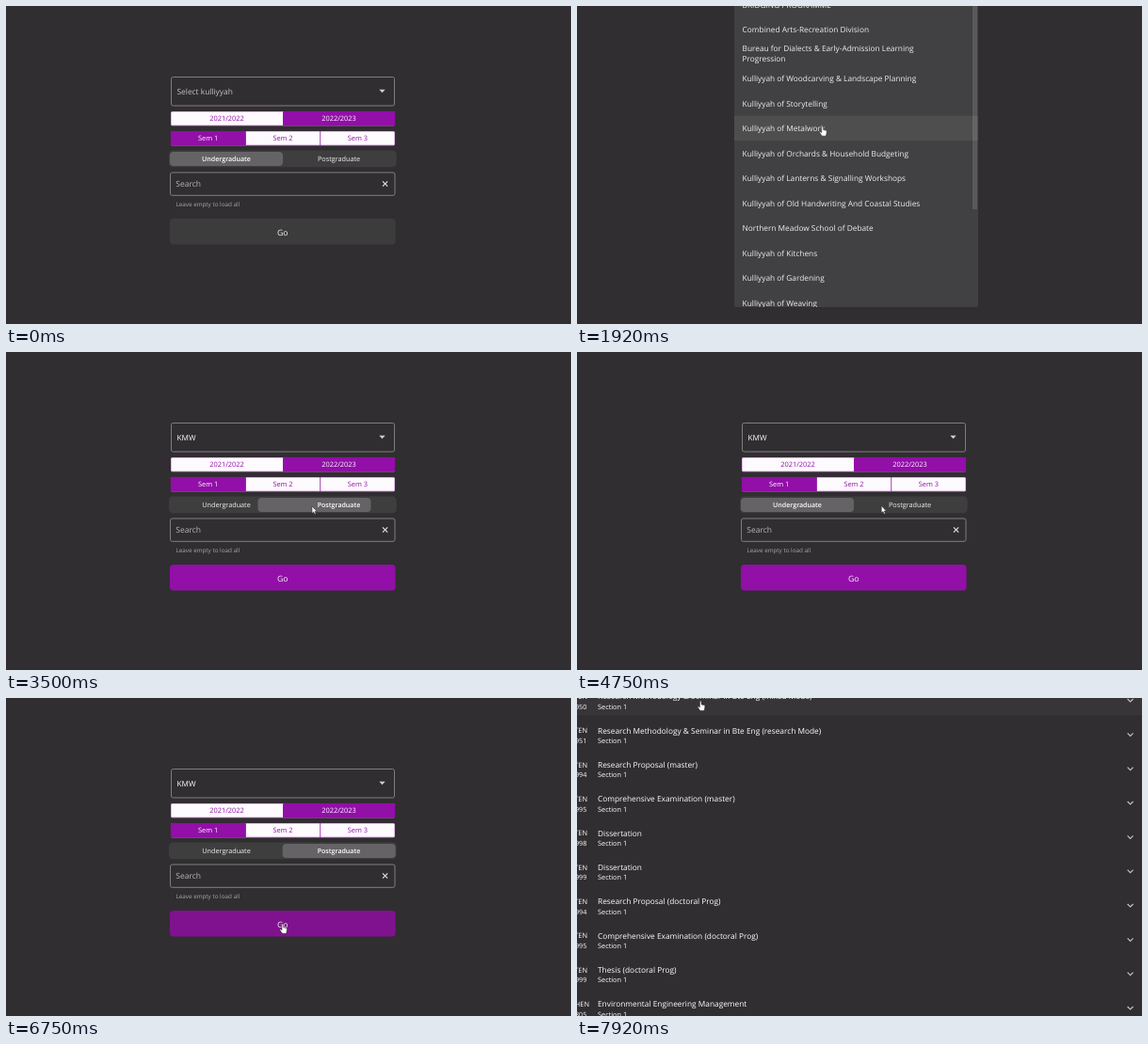
Recreate the animation shown at these times as an HTML page. Size 600 px wide and 338 px high, loop 8000 ms.

```html
<!DOCTYPE html>
<html lang="en">
<head>
<meta charset="utf-8">
<title>Course finder</title>
<style>
  html, body { margin: 0; width: 100%; height: 100%; overflow: hidden; background: #302e30; }
  svg { display: block; width: 600px; height: 338px; }
  text { font-family: "Open Sans", "Noto Sans", sans-serif; text-rendering: geometricPrecision; white-space: pre; }
</style>
</head>
<body>
<script>
const LOOP = 8000;
const BG = '#302e30', PURPLE = '#920fa8', WHITE = '#fdfbfd', LINE = '#807f80', BLUE = '#3f9fcb';
const WIN_LEFT = -15, WIN_WIDTH = 617;

// ---------- drawing helpers ----------
function el(parent, tag, attrs = {}) {
  const node = document.createElementNS('http://www.w3.org/2000/svg', tag);
  set(node, attrs);
  parent.appendChild(node);
  return node;
}
function set(node, attrs) {
  for (const key in attrs) node.setAttribute(key, attrs[key]);
}
const group = (parent, attrs) => el(parent, 'g', attrs);
const rect = (parent, x, y, width, height, fill, more) =>
  el(parent, 'rect', { x, y, width, height, fill, ...more });
const path = (parent, d, more) => el(parent, 'path', { d, fill: 'none', ...more });
function label(parent, str, x, y, size, fill = WHITE, anchor = 'start', more) {
  const node = el(parent, 'text', { x, y, 'font-size': size, fill, 'text-anchor': anchor, ...more });
  node.textContent = str;
  return node;
}
const show = (node, on) => set(node, { visibility: on ? 'visible' : 'hidden' });

// ---------- timing helpers ----------
const clamp = v => Math.min(1, Math.max(0, v));
const span = (t, a, b) => clamp((t - a) / (b - a));
const smooth = u => u * u * (3 - 2 * u);
const easeOut = u => 1 - Math.pow(1 - u, 3);

function track(keys, t) {
  if (t <= keys[0][0]) return keys[0].slice(1);
  for (let i = 1; i < keys.length; i++) {
    const a = keys[i - 1], b = keys[i];
    if (t <= b[0]) {
      const u = smooth(span(t, a[0], b[0]));
      return a.slice(1).map((v, k) => v + (b[k + 1] - v) * u);
    }
  }
  return keys[keys.length - 1].slice(1);
}

function bezier(x1, y1, x2, y2) {
  const f = (s, a, b) => 3 * (1 - s) * (1 - s) * s * a + 3 * (1 - s) * s * s * b + s * s * s;
  return x => {
    let lo = 0, hi = 1;
    for (let i = 0; i < 24; i++) {
      const mid = (lo + hi) / 2;
      if (f(mid, x1, x2) < x) lo = mid; else hi = mid;
    }
    return f(lo, y1, y2);
  };
}
const pageEase = bezier(.35, .91, .33, .97);

// ---------- scene ----------
const svg = el(document.body, 'svg', { viewBox: '0 0 600 338', width: 600, height: 338 });
const defs = el(svg, 'defs');
rect(el(defs, 'clipPath', { id: 'field' }), 175.5, 75.5, 237, 30.5);
const menuClip = rect(el(defs, 'clipPath', { id: 'menuBox' }), 167, 0, 259, 320);
const shade = el(defs, 'linearGradient', { id: 'shade' });
el(shade, 'stop', { offset: 0, 'stop-opacity': .03 });
el(shade, 'stop', { offset: 1, 'stop-opacity': .1 });
rect(svg, 0, 0, 600, 338, BG);

// form
const form = group(svg);
const ripple = el(form, 'circle', { cx: 269, cy: 88, fill: '#fff', 'clip-path': 'url(#field)' });
const field = rect(form, 175.5, 75.5, 237, 30.5, 'none', { rx: 2 });
const hint = label(form, 'Select kulliyyah', 181.5, 93.8, 8.4, '#c4c3c4');
const choice = label(form, 'KMW', 181.5, 93.8, 8.2);
path(form, 'M396.3 88.8h6.4l-3.2 3.4z', { fill: '#cfcecf' });

function buttonRow(y, names, active) {
  const w = 238 / names.length;
  rect(form, 175, y, 238, 15.2, WHITE, { rx: 1.5 });
  names.forEach((name, i) => {
    const x = 175 + i * w, on = i === active;
    if (on) rect(form, x, y, w, 15.2, PURPLE, { rx: 1 });
    else if (i) rect(form, x - .3, y, .8, 15.2, PURPLE);
    label(form, name, x + w / 2, y + 10.3, 7.4, on ? WHITE : PURPLE, 'middle');
  });
  rect(form, 175.2, y + .2, 237.6, 14.8, 'none', { rx: 1.5, stroke: PURPLE, 'stroke-width': .4 });
}
buttonRow(112, ['2021/2022', '2022/2023'], 1);
buttonRow(133, ['Sem 1', 'Sem 2', 'Sem 3'], 0);

rect(form, 173, 153.4, 241.7, 17.8, '#3f3e3f', { rx: 4.5 });
const thumb = rect(form, 174, 155, 120, 15, '#656365', { rx: 4 });
const levels = [['Undergraduate', 234], ['Postgraduate', 353.5]].map(([name, x]) => ({
  x,
  plain: label(form, name, 0, 0, 7.25, '#f2f1f2', 'middle'),
  bold: label(form, name, 0, 0, 7.05, '#fff', 'middle', { 'font-weight': 600 })
}));

rect(form, 174.5, 177, 238.5, 24.3, 'none', { rx: 2, stroke: LINE });
label(form, 'Search', 180.3, 192, 8.5, '#b9b8b9');
path(form, 'M400 186.4l5.2 5.2m0-5.2l-5.2 5.2', { stroke: '#dedddf', 'stroke-width': 1.2 });
label(form, 'Leave empty to load all', 180.5, 213.2, 6.3, '#a9a8a9');
const go = rect(form, 174, 226, 239.6, 27.6, PURPLE, { rx: 4 });
label(form, 'Go', 293.7, 243.5, 8.7, '#f5f4f5', 'middle');

// drop-down menu
const menu = group(svg);
const sheet = group(menu, { 'clip-path': 'url(#menuBox)' });
rect(sheet, 167, -10, 259, 330, '#414042', { rx: 2 });
const menuHover = rect(sheet, 167, 0, 259, 26.4, '#fff', { opacity: .07 });
const items = [
  ['BRIDGING PROGRAMME'],
  ['Combined Arts-Recreation Division'],
  ['Bureau for Dialects & Early-Admission Learning', 'Progression'],
  ['Kulliyyah of Woodcarving & Landscape Planning'],
  ['Kulliyyah of Storytelling'],
  ['Kulliyyah of Metalwork'],
  ['Kulliyyah of Orchards & Household Budgeting'],
  ['Kulliyyah of Lanterns & Signalling Workshops'],
  ['Kulliyyah of Old Handwriting And Coastal Studies'],
  ['Northern Meadow School of Debate'],
  ['Kulliyyah of Kitchens'],
  ['Kulliyyah of Gardening'],
  ['Kulliyyah of Weaving']
].map((lines, i) => {
  const mid = i < 2 ? -1.5 + 26 * i : i === 2 ? 50.5 : 77 + 26.5 * (i - 3);
  const node = group(sheet);
  lines.forEach((line, k) =>
    label(node, line, 175.6, mid + 3 + (k - (lines.length - 1) / 2) * 11.5, 8.3, '#efeeef'));
  return node;
});
const scrollbar = rect(menu, 420, 0, 5, 216, '#fff');

// loading page
const page = group(svg);
rect(page, -31, 0, 31, 338, 'url(#shade)');
rect(page, 0, 0, WIN_WIDTH, 338, BG);
const loader = group(page, { transform: `translate(${-WIN_LEFT} 0)` });
label(loader, 'Please wait...', 293.9, 156.6, 7.15, '#fff', 'middle');
const spinner = path(loader, '', { stroke: '#3a8bbf', 'stroke-width': 2.6 });

// course list
const list = group(svg);
const PITCH = 36.33;
const rowHover = rect(list, 0, 0, 600, PITCH, '#fff', { opacity: .03 });
[
  ['BTEN', 950, 'Research Methodology & Seminar in Bte Eng (mixed Mode)'],
  ['BTEN', 951, 'Research Methodology & Seminar in Bte Eng (research Mode)'],
  ['BTEN', 994, 'Research Proposal (master)'],
  ['BTEN', 995, 'Comprehensive Examination (master)'],
  ['BTEN', 998, 'Dissertation'],
  ['BTEN', 999, 'Dissertation'],
  ['BTEN', 994, 'Research Proposal (doctoral Prog)'],
  ['BTEN', 995, 'Comprehensive Examination (doctoral Prog)'],
  ['BTEN', 999, 'Thesis (doctoral Prog)'],
  ['CHEN', 805, 'Environmental Engineering Management']
].forEach(([code, num, title], i) => {
  const y = -1.6 + i * PITCH;
  label(list, code, i < 9 ? 11 : 13, y + 2.6, 7.4, '#fff', 'end');
  label(list, num, 10.3, y + 13.2, 7.2, '#fff', 'end');
  label(list, title, 22, y + 2.9, 8.32, '#fff');
  label(list, 'Section 1', 22, y + 13.4, 7.35, '#fff');
  path(list, `M584.6 ${y + 2.6}l3 3l3-3`, { stroke: '#c3c2c3', 'stroke-width': 1.2 });
});

// pointer
const pointer = group(svg);
const arrow = path(pointer, 'M0 0v7.4l1.7-1.5l1.2 2.7l1.2-.5l-1.2-2.6h2.3z',
  { fill: '#fff', stroke: '#222', 'stroke-width': .5 });
const hand = path(pointer,
  'M-.8 .6q.9-1 1.7 0v3.1l3 .7q1 .3.8 1.5l-.6 3.6q-.2.8-1 .8h-2.9q-.7 0-1.1-.7l-2.2-3.3q.5-1 1.5-.2l.8.7z',
  { fill: '#fff', stroke: '#222', 'stroke-width': .5 });

// ---------- motion tables ----------
const POINTER = [
  [420, 502, 171], [1170, 268.5, 84], [1500, 268.5, 84], [2000, 260, 131],
  [2920, 260, 131], [3080, 335, 176], [3170, 325, 164], [3560, 325, 164],
  [3830, 254, 162], [4500, 254, 162], [4850, 340, 164], [5250, 340, 164],
  [5700, 455, 164.5], [5830, 455, 164.5], [6500, 293.8, 240], [7080, 293.8, 240],
  [7420, 218, 149], [7900, 131.2, 3.2]
];
const SLIDES = [[3370, 1], [4200, 0], [4960, 1]];
const HOTSPOTS = [[175, 75, 413, 106], [175, 112, 413, 127.2], [175, 133, 413, 148.2], [174, 226, 414, 254]];
const CLOSE = 2354, PUSH = 6755, LOADED = 7330;

function drawMenu(t, y) {
  const closing = t >= CLOSE;
  const v = closing ? 1 - span(t, CLOSE, CLOSE + 300) : span(t, 1340, 1640);
  set(menu, { opacity: closing ? clamp((v - .75) * 4) : clamp(v * 4) });
  const grow = closing ? 1 : smooth(clamp((v - .27) * 4));
  set(menuClip, { height: 11 + 309 * grow });
  set(scrollbar, { opacity: .03 + .1 * v });
  const unit = .5 / 19.5;
  items.forEach((node, i) =>
    set(node, { opacity: i ? clamp((v - .5 - (i + 1) * unit) / (1.5 * unit)) : 1 }));
  set(menuHover, { y: 63.7 + 26.5 * Math.floor((y - 63.7) / 26.5) });
  show(menu, v > 0);
}

function drawLevels(t) {
  let pos = 0, active = 0;
  for (const [start, to] of SLIDES) {
    if (t < start) break;
    pos += (to - pos) * easeOut(span(t, start, start + 330));
    active = to;
  }
  const press = span(t, 5320, 5420) - span(t, 5880, 5980);
  const k = 1 - .05 * press;
  set(thumb, { x: 174 + 119.7 * pos, y: 162.5 - 7.5 * k, width: 120 * k, height: 15 * k });
  levels.forEach((lv, i) => {
    const on = i === active;
    show(lv.plain, !on);
    show(lv.bold, on);
    const s = on ? k : 1;
    for (const node of [lv.plain, lv.bold])
      set(node, { transform: `translate(${lv.x} 165.2) scale(${s})` });
  });
}

function drawSpinner(t) {
  const turn = (t - 7000) * .0062;
  const a = -.95 + turn, b = .95 + turn, r = 8.6;
  const pt = q => `${294 + r * Math.cos(q)} ${172.8 + r * Math.sin(q)}`;
  set(spinner, { d: `M${pt(a)}A${r} ${r} 0 0 1 ${pt(b)}` });
}

function draw(t) {
  const [px, py] = track(POINTER, t);
  const chosen = t >= CLOSE;

  // select field
  const focus = t >= 1250 && t < CLOSE;
  set(field, { stroke: focus ? BLUE : LINE, 'stroke-width': focus ? 1.3 : 1 });
  show(hint, !chosen);
  show(choice, chosen);
  set(ripple, {
    r: 8 + 22 * span(t, 1300, 1420) + 150 * span(t, 1420, 1700),
    opacity: t < 1300 ? 0 : .1 * (1 - span(t, 1450, 1750))
  });
  set(go, { fill: !chosen ? '#3d3c3d' : t < 6670 ? PURPLE : '#80128f' });

  drawMenu(t, py);
  drawLevels(t);

  // page push with parallax
  const p = pageEase(span(t, PUSH, PUSH + 500));
  set(form, { transform: `translate(${-WIN_WIDTH / 3 * p} 0)` });
  set(page, { transform: `translate(${WIN_LEFT + WIN_WIDTH * (1 - p)} 0)` });
  show(page, t >= PUSH);
  drawSpinner(t);

  const loaded = t >= LOADED;
  show(loader, t >= PUSH && !loaded);
  show(list, loaded);
  set(rowHover, { y: -18.2 + PITCH * Math.floor((py + 18.2) / PITCH) });

  // pointer
  const over = HOTSPOTS.some(([l, top, r, b]) => px >= l && px <= r && py >= top && py <= b);
  const isHand = loaded || t >= 1250 && t < CLOSE || t < PUSH && over;
  set(pointer, { transform: `translate(${px} ${py})` });
  const seen = t >= 420;
  show(arrow, seen && !isHand);
  show(hand, seen && isHand);
}

const begin = performance.now();
function tick() {
  draw((performance.now() - begin) % LOOP);
  requestAnimationFrame(tick);
}
draw(0);
requestAnimationFrame(tick);
</script>
</body>
</html>
```
